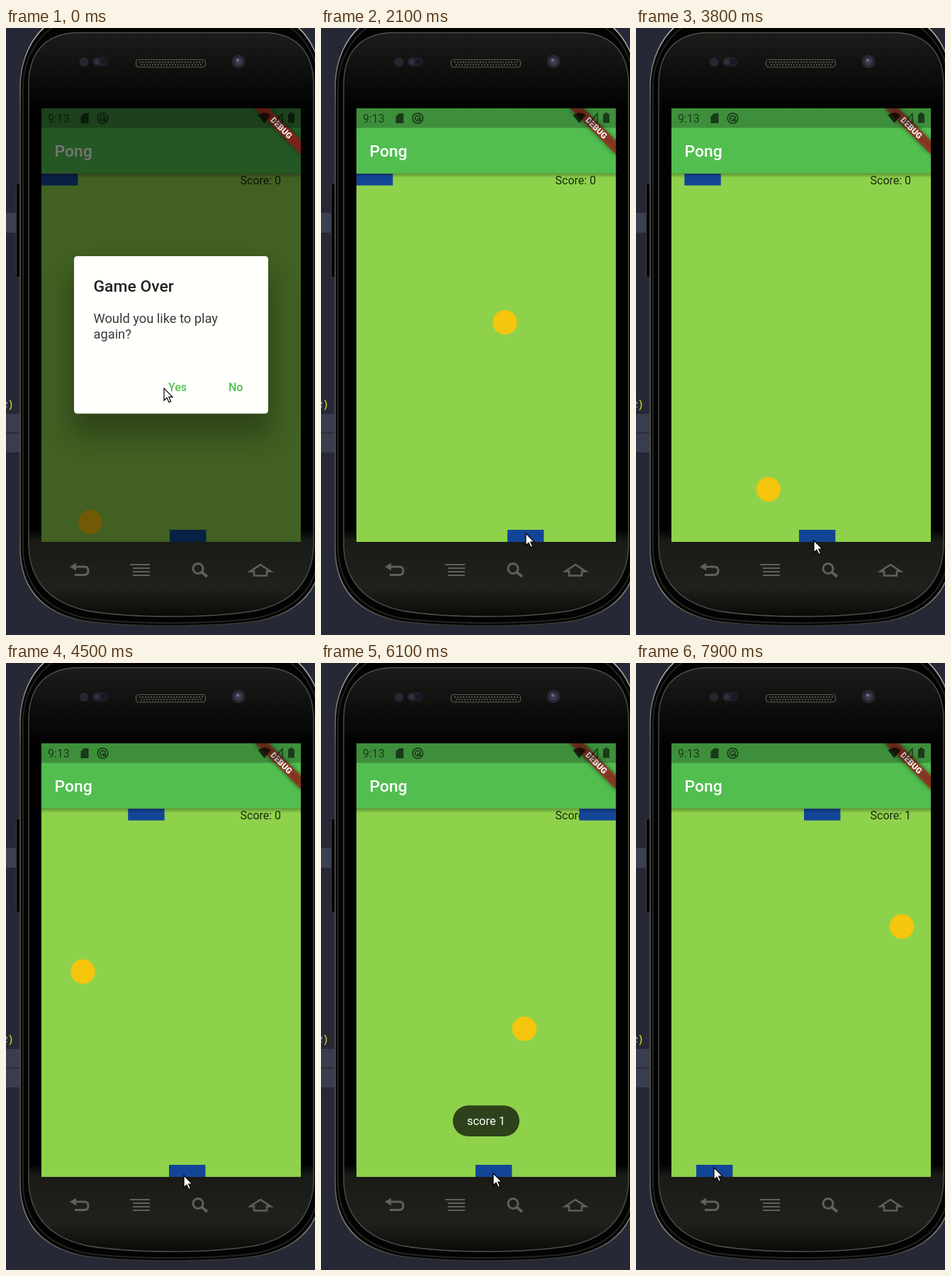
Recreate the animation shown at these times as an HTML page. Size 436x854 px, loop 8000 ms.

```html
<!DOCTYPE html>
<html lang="en">
<head>
<meta charset="utf-8">
<title>Pong</title>
<style>
  html, body { margin: 0; width: 100%; height: 100%; overflow: hidden; background: #262835; }
  svg { display: block; width: 436px; height: 854px; }
  text { font-family: Roboto, "Open Sans", sans-serif; font-size: 16px; }
  .bold { font-weight: 500; }
  .big { font-size: 22.9px; }
  .body { font-size: 18.3px; }
  .code { font: 17px "Noto Sans Mono", monospace; }
  .line { fill: none; }
  .nav { fill: none; stroke: #5f5f5c; stroke-width: 3; }
  .bat { fill: #134597; }
</style>
</head>
<body>
<svg viewBox="0 0 436 854">
  <defs>
    <linearGradient id="shell" x1="0" y1="0" x2="0" y2="1">
      <stop offset="0" stop-color="#1c1c1a"/>
      <stop offset=".12" stop-color="#040404"/>
      <stop offset=".14" stop-color="#000"/>
      <stop offset=".85" stop-color="#000"/>
      <stop offset=".87" stop-color="#1a1b16"/>
      <stop offset=".95" stop-color="#20211c"/>
      <stop offset="1" stop-color="#0a0a08"/>
    </linearGradient>
    <linearGradient id="rim" x1="0" y1="0" x2="0" y2="1">
      <stop offset="0" stop-color="#c2c2bc"/>
      <stop offset=".06" stop-color="#85857f"/>
      <stop offset=".15" stop-color="#555551"/>
      <stop offset=".85" stop-color="#555551"/>
      <stop offset=".95" stop-color="#83837d"/>
      <stop offset="1" stop-color="#33332f"/>
    </linearGradient>
    <linearGradient id="barShade" x1="0" y1="0" x2="0" y2="1">
      <stop offset="0" stop-color="#000" stop-opacity=".32"/>
      <stop offset="1" stop-color="#000" stop-opacity="0"/>
    </linearGradient>
    <filter id="soft" x="-40%" y="-40%" width="180%" height="190%"><feGaussianBlur stdDeviation="19"/></filter>
    <filter id="softBand" x="-40%" y="-60%" width="180%" height="220%"><feGaussianBlur stdDeviation="3.4"/></filter>
    <clipPath id="screen"><rect x="50" y="113" width="366" height="610"/></clipPath>
  </defs>

  <!-- editor behind the phone -->
  <rect width="436" height="854" fill="#262835"/>
  <rect y="260" width="20" height="28" fill="#3c4052"/>
  <rect y="543" width="24" height="54" fill="#3a3d4d"/>
  <rect y="569" width="24" height="1.5" fill="#262835"/>
  <text class="code" x="-7" y="534" fill="#8f93a0">e</text>
  <text class="code" x="1.5" y="534.5" fill="#c6d81f">)</text>

  <!-- phone -->
  <rect x="14.5" y="219" width="9" height="132" rx="2.5" fill="#050505" stroke="#3d3d3d"/>
  <path fill="#030303" stroke="url(#rim)" stroke-width="1.6"
    d="M20 80C21 45 35 13 60 -6H406C431 13 445 45 446 80V738C443 797 407 824 357 834C316 840 276 841 233 841C190 841 150 840 109 834C59 824 23 797 20 738Z"/>
  <path class="line" stroke="#23231f" stroke-width="2"
    d="M24 80C25 47 41 14 70 -4H396C425 14 441 47 442 80V735C439 792 404 819 355 830C315 836 275 837 233 837C191 837 151 836 111 830C62 819 27 792 24 735Z"/>
  <path fill="url(#shell)" stroke="#4e4e4a" stroke-width="1.4"
    d="M32 80C32 38 52 9 98 6.500H368C414 9 434 38 434 80V729C432 783 399 810 351 820C314 826 275 828 233 828C191 828 152 826 115 820C67 810 34 783 32 729Z"/>

  <g fill="#1f1f2a">
    <circle cx="110" cy="48" r="6.500" fill="#262630"/>
    <rect x="122" y="41" width="22" height="13" rx="6.500"/>
    <circle cx="128" cy="47.500" r="4" fill="#30303d"/>
    <circle cx="138" cy="47.500" r="4" fill="#191926"/>
    <circle cx="328" cy="47" r="9.500" fill="#272731"/>
    <circle cx="328" cy="47" r="5.500" fill="#3b3c50"/>
    <circle cx="327" cy="45.500" r="2" fill="#6c7088"/>
  </g>
  <rect x="183.500" y="44.500" width="98" height="10.500" rx="4" fill="#11110f" stroke="#5c5c55" stroke-width="1.2"/>
  <path d="M188 48H278M190 51.500H278" stroke="#55554e" stroke-width="2" stroke-dasharray="2 2"/>

  <g class="nav">
    <path d="M96 758H111Q116 758 116 763.500T111 769.500H97"/>
    <path d="M90 758L99 752.500V763.500Z" fill="#5f5f5c" stroke="none"/>
    <path d="M175 755H203M179 760H203M179 765H203M179 770H203" stroke-width="2.200"/>
    <circle cx="271" cy="760.500" r="7"/>
    <path d="M276 765.500L284 772" stroke-width="4"/>
    <path d="M344.500 764.500L359 755L373.500 764.500H368V770.500H350V764.500Z" stroke-width="2.600"/>
  </g>

  <g clip-path="url(#screen)">
    <rect x="50" y="204" width="366" height="519" fill="#8ed24b"/>
    <text id="score" x="330.500" y="220" fill="#1c2a10">Score: 0</text>
    <circle id="ball" r="17.200" fill="#f6c50d"/>
    <rect id="top" class="bat" y="205" width="51.400" height="16.500"/>
    <rect id="bat" class="bat" y="706" width="51.400" height="17"/>

    <rect x="50" y="204" width="366" height="7" fill="url(#barShade)"/>
    <rect x="50" y="113" width="366" height="91.500" fill="#52be50"/>
    <text class="bold big" x="68.500" y="181" fill="#fff">Pong</text>

    <g id="toast">
      <rect x="186" y="622.500" width="94" height="43.500" rx="21.700" fill="#2d421a"/>
      <text x="233" y="650" fill="#fff" text-anchor="middle" style="font-size:16.500px">score 1</text>
    </g>

    <g id="dialog">
      <rect x="50" y="113" width="366" height="610" fill="#000" opacity=".54"/>
      <rect x="92" y="345" width="282" height="228" rx="12" opacity=".3" filter="url(#soft)"/>
      <rect x="96" y="321" width="274" height="221.500" rx="4.600" fill="#fffffc"/>
      <text class="bold big" x="123.500" y="371" fill="#222">Game Over</text>
      <g fill="#3a3a3a">
        <text class="body" x="123.500" y="415">Would you like to play</text>
        <text class="body" x="123.500" y="437">again?</text>
      </g>
      <g fill="#52be50" class="bold">
        <text x="229" y="511">Yes</text>
        <text x="314" y="511">No</text>
      </g>
    </g>

    <g transform="translate(416 113) rotate(45)">
      <rect x="-46" y="32" width="92" height="13.800" opacity=".5" filter="url(#softBand)"/>
      <rect x="-46" y="32" width="92" height="13.800" fill="#b71c1c" opacity=".63"/>
      <text y="43" fill="#fff" text-anchor="middle" style="font-size:11.700px;font-weight:900">DEBUG</text>
    </g>

    <!-- the system status bar lies over the app -->
    <rect x="50" y="113" width="366" height="27.500" opacity=".25"/>
    <g opacity=".58">
      <text x="59" y="133">9:13</text>
      <path d="M110 120H116.500V134H105.500V124.500Z"/>
      <g class="line" stroke="#000" stroke-width="1.800">
        <circle cx="136.500" cy="127" r="7.200"/>
        <circle cx="136.500" cy="127" r="3.600"/>
        <path d="M136 127L142 132"/>
        <path d="M390 120.500V133H379Z" stroke-width="1.500"/>
      </g>
      <path d="M398 121H400.500V119H404.500V121H407V133.500H398Z"/>
    </g>
    <path d="M355.500 122.500Q364.500 115.500 373.500 122.500L364.500 134Z" opacity=".7"/>
  </g>

  <path id="cursor" d="M0 0V17L4 13.200L7 19.500L9.600 18.400L6.800 12.200H12Z" fill="#fff" stroke="#000" stroke-width="1.200"/>
</svg>

<script>
  const LOOP = 8000, STEP = 100;
  const LEFT = 67, RIGHT = 399, ROOF = 239, FLOOR = 689;
  const RESTART = 800, SERVE = 1134, BAT_HIT = 3482, SCORE = 5136, SECOND_HIT = 6710;
  const el = id => document.getElementById(id);

  // Progress from 0 to 1 between two times; pow > 1 starts slowly.
  const ramp = (t, from, to, pow = 1) =>
    Math.min(1, Math.max(0, (t - from) / (to - from))) ** pow;
  const leg = (t, t0, t1, a, b) => a + (b - a) * ramp(t, t0, t1);

  // The ball crosses the court once between each pair of wall hits.
  const wallHits = [1075, 2843, 4341, 5615, 7053, 7966];

  function ballX(t) {
    const i = Math.max(0, wallHits.findLastIndex(hit => hit <= t));
    const p = ramp(t, wallHits[i], wallHits[i + 1] ?? 2 * LOOP);
    return LEFT + (RIGHT - LEFT) * (i % 2 ? 1 - p : p);
  }

  function ballY(t) {
    if (t < BAT_HIT) return leg(t, SERVE, BAT_HIT, 222, FLOOR);
    if (t < SCORE) return leg(t, 3670, SCORE, FLOOR, ROOF);
    if (t < SECOND_HIT) return leg(t, SCORE, SECOND_HIT, ROOF, FLOOR);
    return leg(t, SECOND_HIT, LOOP, FLOOR, 344);
  }

  const topX = t => 50 + 314.5 * ramp(t, BAT_HIT, 5300, 1.63) - 127.5 * ramp(t, SECOND_HIT, 7900);

  // Sideways drags shared by the bat and the mouse.
  const drag = t => 32 * ramp(t, 1550, 2100) - 133 * ramp(t, 6100, 6600);
  const batX = t => 231 + drag(t) - 33 * ramp(t, 2500, 3400, 3) - 12 * ramp(t, 4500, 5400);
  const mouseX = t => 223 + drag(t) + 17 * (ramp(t, 200, 600) + ramp(t, 900, 1400))
    - 38 * ramp(t, 2500, 3400, 2) - 8 * ramp(t, 4500, 5400);
  const mouseY = t => 507 - 4 * ramp(t, 200, 600) + 208 * ramp(t, 900, 1400)
    + 10 * ramp(t, 2500, 3400) - 3 * ramp(t, 4500, 5400) - 8 * ramp(t, 6100, 6600);

  const place = (id, x, y = 0) => el(id).setAttribute("transform", `translate(${x} ${y})`);
  const fade = (id, value) => el(id).setAttribute("opacity", value);

  function draw(now) {
    const t = Math.floor(now % LOOP / STEP) * STEP;
    if (t < RESTART) place("ball", 119, 695);
    else place("ball", ballX(t), ballY(t));
    place("cursor", mouseX(t), mouseY(t));
    place("top", topX(t));
    place("bat", batX(t));
    fade("dialog", 1 - ramp(t, 700, 900));
    fade("toast", ramp(t, 5200, 5400) - ramp(t, 6200, 6400));
    el("score").textContent = "Score: " + (t >= SCORE ? 1 : 0);
  }

  const start = performance.now();
  function tick() {
    draw(performance.now() - start);
    requestAnimationFrame(tick);
  }
  tick();
</script>
</body>
</html>
```
